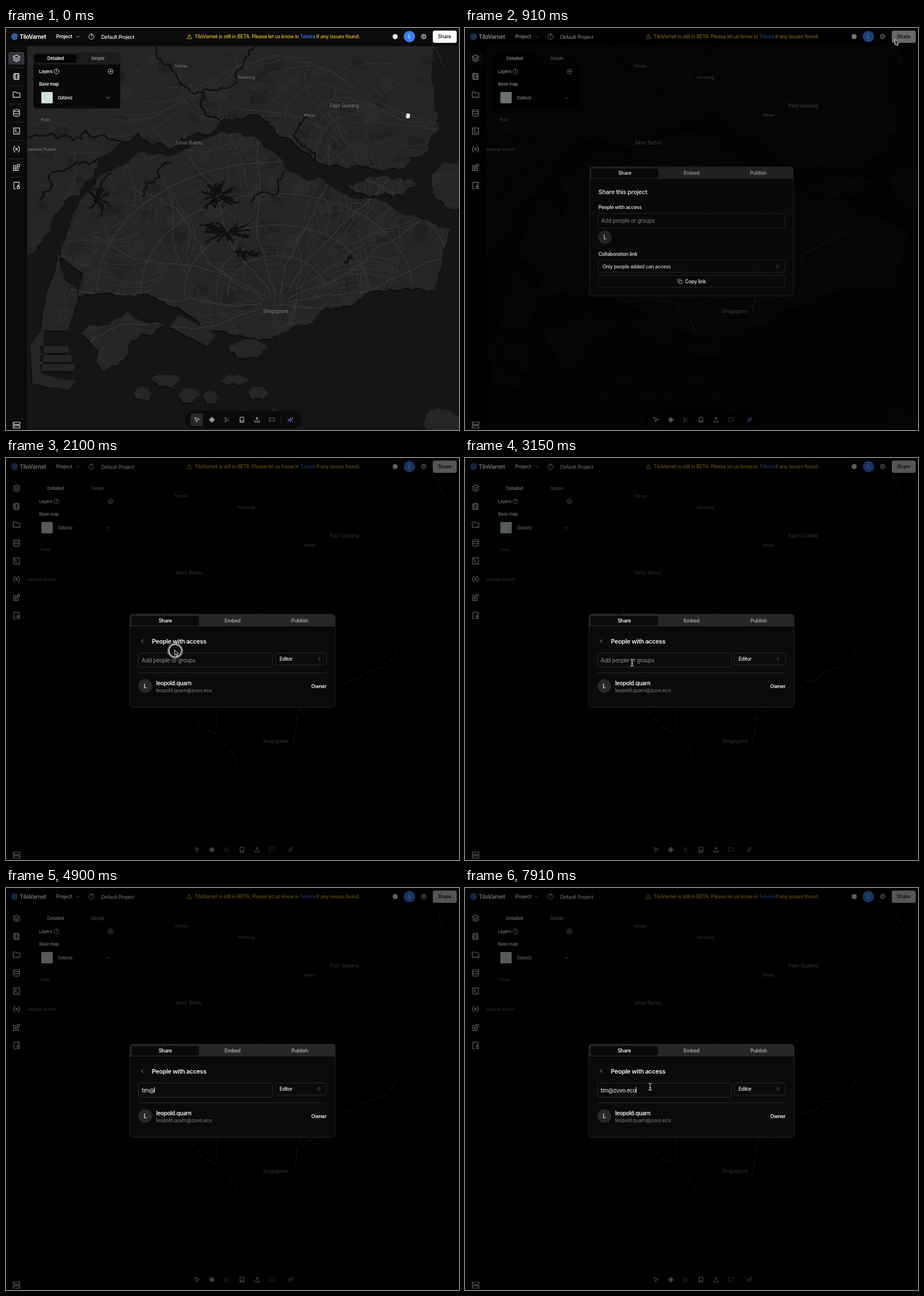
Write an HTML page that moves like this. It is 795 px wide and 704 px high and loops after 8 s.

```html
<!DOCTYPE html>
<html lang="en">
<head>
<meta charset="utf-8">
<title>Share a project</title>
<style>
  html, body { margin: 0; height: 100%; overflow: hidden; background: #000; }
  svg { display: block; width: 100vw; height: 100vh; }
  text { font-family: Inter, Arial, sans-serif; letter-spacing: -.03em; white-space: pre; }
  .place { font-family: "Noto Sans", sans-serif; letter-spacing: 0; }
</style>
</head>
<body>
<svg id="stage" viewBox="0 0 795 704"></svg>
<script>
const LOOP = 8000;
const WHITE = '#f5f5f5', GREY = '#a3a3a0', EDGE = '#2a2a2a', CARD = '#0a0a0a', MUTED = '#92929a';
const SEA = '#151515', LAND = '#252525';

// Seeded random numbers keep the map the same on every load.
let seed = 11;
const rnd = () => (seed = (seed * 16807) % 2147483647) / 2147483647;
const spread = size => (rnd() - .5) * size;
const repeat = (count, make) => Array.from({ length: count }, (_, i) => make(i)).join('');

// ---- Drawing helpers ----
const text = (x, y, str, size = 8.75, weight = 500, fill = WHITE, anchor = 'start', extra = '') =>
  `<text x="${x}" y="${y + size * .36}" font-size="${size}" font-weight="${weight}" fill="${fill}" text-anchor="${anchor}" ${extra}>${str}</text>`;
const rect = (x, y, w, h, r = 0, fill = 'none', stroke = 'none') =>
  `<rect x="${x}" y="${y}" width="${w}" height="${h}" rx="${r}" fill="${fill}" stroke="${stroke}"/>`;
const circle = (x, y, r, fill = 'none', stroke = 'none', width = 1) =>
  `<circle cx="${x}" cy="${y}" r="${r}" fill="${fill}" stroke="${stroke}" stroke-width="${width}"/>`;
const line = (d, stroke, width = 1, extra = '') =>
  `<path d="${d}" fill="none" stroke="${stroke}" stroke-width="${width}" stroke-linejoin="round" stroke-linecap="round" ${extra}/>`;
const icon = (x, y, d, size = 14, color = '#e5e5e5') =>
  `<g transform="translate(${x - size / 2} ${y - size / 2}) scale(${size / 24})">${line(d, color, 2)}</g>`;

const CHEVRON_DOWN = 'M5 9l7 7 7-7';
const CHEVRONS = 'M7 15l5 5 5-5M7 9l5-5 5 5';

// ---- Map ----
// Splits each side with random offsets, so a few points become a natural shore.
function rough(points, closed = true, amount = .2) {
  let pts = points.split(' ').map(p => p.split(',').map(Number));
  for (let pass = 0; pass < 4; pass++) {
    pts = pts.flatMap((a, i) => {
      if (!closed && i === pts.length - 1) return [a];
      const b = pts[(i + 1) % pts.length], k = spread(2 * amount);
      return [a, [(a[0] + b[0]) / 2 - (b[1] - a[1]) * k, (a[1] + b[1]) / 2 + (b[0] - a[0]) * k]];
    });
  }
  return 'M' + pts.map(p => p.map(v => v.toFixed(1))).join('L') + (closed ? 'Z' : '');
}

function island(x, y, w, h) {
  const corners = Array.from({ length: 6 }, (_, i) =>
    [x + Math.cos(i * Math.PI / 3) * w * (.4 + rnd() * .2), y + Math.sin(i * Math.PI / 3) * h * (.4 + rnd() * .2)]);
  return rough(corners.join(' '));
}

const NORTH_SHORE = '30,20 752,20 746,88 750,130 740,215 690,248 612,241 547,236 490,190 440,152 385,158 345,185 290,211 232,182 185,216 128,295 75,358 30,402';
const MAIN_ISLAND = '322,210 375,181 432,190 492,248 550,262 604,296 690,322 786,348 752,458 650,459 560,489 480,536 405,538 296,488 215,468 128,470 96,398 112,340 160,262 240,216';
const land = rough(NORTH_SHORE) + rough(MAIN_ISLAND, true, .15) +
  rough('130,535 214,494 276,520 214,570 170,602') +
  rough('92,398 62,530 42,556 46,622 108,634 125,618 62,605 66,530 108,530 136,430', true, .04) +
  island(662, 277, 115, 38) + island(798, 272, 100, 90) + island(762, 696, 70, 60) + island(425, 562, 64, 30) +
  repeat(7, i => island(240 + i * 40, 640 + spread(80), 30 + rnd() * 24, 16 + rnd() * 10)) +
  repeat(3, i => `M60 ${557 + i * 16}h${50 + i * 5}v12H60z`) +
  repeat(2, i => `M${302 + i * 32} ${502 + i * 16}l34 18-14 22-34-18z`);

// Streets follow a slowly turning grid.
function streets(count, steps, x0, y0, w, h) {
  return repeat(count, () => {
    let x = x0 + rnd() * w, y = y0 + rnd() * h, d = `M${x} ${y}`;
    const turn = rnd() < .5 ? Math.PI / 2 : 0;
    for (let k = 0; k < steps; k++) {
      const angle = Math.sin(x / 90) + Math.cos(y / 70) + turn + spread(.5);
      d += `L${(x += Math.cos(angle) * 8).toFixed(1)} ${(y += Math.sin(angle) * 8).toFixed(1)}`;
    }
    return d;
  });
}

// Expressways: spokes from the city centre, crossed by rings.
const spokes = repeat(11, i => {
  const a = Math.PI * (.92 + i * .11);
  const at = (r, bend) => [475 + Math.cos(a + bend) * r * 1.25, 485 + Math.sin(a + bend) * r].join();
  return rough(`${at(20, 0)} ${at(120, spread(.3))} ${at(220, spread(.2))} ${at(290, 0)}`, false, .07);
});
const rings = repeat(4, i => {
  const r = 60 + i * 55;
  return `M${475 - r * 1.4} 470A${r * 1.4} ${r} 0 0 1 ${475 + r * 1.4} 450`;
});

const patches = count => repeat(count, () => {
  const w = 8 + rnd() * 24;
  return `M${45 + rnd() * 690} ${40 + rnd() * 450}l${w} ${spread(14)}l${spread(10)} ${w * .7}l${-w} ${spread(12)}z`;
});

// A reservoir is a cluster of short thick arms.
const reservoir = (x, y, w, h) => line(repeat(Math.round(w * h / 90), () => {
  const dx = spread(w), dy = spread(h);
  return `M${x + dx * .3} ${y + dy * .3}l${dx * .7} ${dy * .7}l${spread(14)} ${spread(10)}`;
}), '#101010', 3.4);

const rivers = ['250,20 300,85 374,160', '448,20 420,52 345,108', '545,235 505,190 528,155', '38,190 140,180 232,184', '60,300 120,240 160,228', '290,236 268,262 240,295', '430,305 478,285 490,250', '185,255 160,290 165,330']
  .map(s => rough(s, false, .28)).join('');

const map = `
  ${rect(0, 0, 795, 704, 0, SEA)}
  <clipPath id="shore"><path d="${land}"/></clipPath>
  <path d="${land}" fill="#0d0d0d" transform="translate(-1.5 2)"/>
  <path d="${land}" fill="${LAND}"/>
  <g clip-path="url(#shore)">
    <path d="${patches(110)}" fill="#202020"/><path d="${patches(50)}" fill="#292929"/>
    ${line(streets(520, 5, 110, 190, 580, 340), '#313131', .8)}
    ${line(streets(90, 16, 110, 200, 640, 330), '#343434', 1)}
    ${line(streets(220, 6, 40, 35, 710, 200), '#2d2d2d', .7)}
    ${line(streets(34, 26, 40, 35, 700, 190), '#333', 1.1)}
    ${line(streets(70, 5, 42, 400, 220, 230), '#303030', .8)}
    ${line(spokes + rings, '#363636', 1.7)}
    ${line(rivers, '#101010', 3)}
    ${reservoir(372, 294, 56, 46)}${reservoir(388, 358, 84, 34)}${reservoir(422, 397, 44, 18)}${reservoir(162, 300, 36, 38)}${reservoir(602, 401, 18, 20)}
  </g>`;

const railways = ['690,330 660,366 600,392 505,460', '278,262 300,400 372,486 405,535', '440,270 410,370 370,470', '548,275 510,370 505,500', '750,32 770,68']
  .map(s => rough(s, false, .1)).join('');
const place = (x, y, str, size = 7) => text(x, y, str, size, 500, '#858585', 'start', 'class="place"');
const labels = line(railways, '#4a4a4a', .8, 'stroke-dasharray="2 1.6"') +
  place(296, 66, 'Tebrau') + place(407, 86, 'Plentong') + place(523, 152, 'Masai') + place(568, 136.5, 'Pasir Gudang', 8.2) +
  place(298, 201.5, 'Johor Bahru', 8.3) + place(61, 160, 'Pulai') + place(38, 212, 'kandar Puteri', 7.8) + place(451, 496, 'Singapore', 9.4);

// ---- Application frame ----
const surfaces = rect(0, 0, 795, 32, 0, CARD) + rect(0, 32, 38, 672, 0, CARD) +
  line('M0 32H795M37.5 32V704', '#1d1d1d', .8) + line(repeat(7, i => `M5 ${69 + i * 32}H32`) + 'M5 684H32', '#292929') +
  rect(4, 42, 28, 22, 3, '#34353c') +
  rect(48, 43, 152.5, 98, 5, '#090909') + rect(48, 43, 152.5, 21, 5, '#1b1b1a') + rect(50, 46, 74, 15, 3, '#050505') +
  rect(314, 670.5, 205, 31, 15.5, '#0a0a0b') + rect(324, 675, 21.5, 22, 3, '#282826') + line('M482.5 678v15', '#242424');

const sidebarIcons = [
  'M12 2 22 7 12 12 2 7ZM2 12l10 5 10-5M2 17l10 5 10-5',
  'M5 3h14v18H5zM9 3v18M15 3v18M2 7h4M2 12h4M2 17h4M15 9h4M15 15h4',
  'M2 4h7l3 3h10v13H2z',
  'M3 5a9 3 0 0 0 18 0a9 3 0 0 0-18 0v14a9 3 0 0 0 18 0V5M3 12a9 3 0 0 0 18 0',
  'M3 3h18v18H3zM7 7l4 4-4 4M12 16h5',
  'M7 3q-8 9 0 18M17 3q8 9 0 18M9 9l6 6M15 9l-6 6',
  'M14 3h7v7h-7zM3 7h7v14H3zM3 14h14v7H3z',
  'M20 9V2H4v20h6M14 15h7v6h-7zM16 15v-4h3v4'
].map((d, i) => icon(18.5, 53 + i * 31.85, d)).join('') + icon(18.5, 695.5, 'M2 3h20v7H2zM2 14h20v7H2zM6 6.5h.1M6 17.5h.1');

const toolbarIcons = [
  'M4 4l7 17 2.5-7.5L21 11z',
  'M9 3h6v5H9zM9 16h6v5H9zM3 9h5v6H3zM16 9h5v6h-5zM12 8v8M8 12h8',
  'M3 6a3 3 0 1 0 6 0a3 3 0 1 0-6 0M3 18a3 3 0 1 0 6 0a3 3 0 1 0-6 0M20 4L8 16M8 8l12 12',
  'M5 2h14v20H5zM5 17h14',
  'M12 15V3M7 8l5-5 5 5M3 15v6h18v-6',
  'M3 4h18v13H8l-5 4z'
].map((d, i) => icon(335 + i * 26.4, 686, d, 10.5, i === 2 || i === 5 ? '#777' : '#e5e5e5')).join('') +
  icon(499, 686, 'M12 4l2 6 7 2-7 2-2 7-2-7-7-2 7-2zM20 2v5M17.5 4.5h5M4 17v4', 10.5, '#8d78e6');

const help = (x, y, r) => circle(x, y, r, 'none', '#e5e5e5', .9) + text(x, y, '?', r * 1.5, 600, '#e5e5e5', 'middle');

const frameUi = circle(15, 15, 6, '#2d5f9c') + text(24, 15, 'TiloVarnet', 9.8, 700) +
  text(88, 15, 'Project', 8.75, 600) + icon(126, 15, CHEVRON_DOWN, 9) + help(150, 15, 4.6) + text(167, 15.5, 'Default Project') +
  icon(321.5, 15, 'M12 3 2 21h20zM12 9v5M12 17.5v.1', 10, '#eab92c') +
  text(331, 15, 'TiloVarnet is still in BETA. Please let us know in <tspan fill="#4a86f0">Tolvira</tspan> if any issues found.', 8.8, 500, '#eebf2f') +
  circle(683, 15, 4.5, '#e8e8e8') + circle(708, 15, 10, '#3b7ff0') + text(708, 15, 'L', 8.5, 500, WHITE, 'middle') +
  circle(733, 15, 3.4, 'none', '#ddd', 1.1) + circle(733, 15, 1.2, 'none', '#ddd', .9) +
  line(repeat(8, i => `M733 15m${4 * Math.cos(i * Math.PI / 4)} ${4 * Math.sin(i * Math.PI / 4)}h.1`), '#ddd', 1.4) +
  `<rect id="shareButton" x="749" y="4.5" width="42" height="21.5" rx="3.5"/>` + text(769.5, 15, 'Share', 8.9, 500, '#111', 'middle') +
  text(87, 53, 'Detailed', 7.7, 600, WHITE, 'middle') + text(161, 53, 'Simple', 7.7, 500, GREY, 'middle') +
  text(58, 76, 'Layers', 7.7, 600) + help(88.5, 76, 4.3) + circle(183.5, 76, 4.3, 'none', '#e5e5e5', .9) + line('M181.500 76h4M183.500 74v4', '#e5e5e5', .9) +
  text(58, 98, 'Base map', 7.7, 600) + rect(62, 112, 20, 20, 2, '#cfdfe0') + line('M64 130l6-9 5-1 5-7', '#e6efee') +
  text(91, 122, 'Dataviz', 7.7) + icon(179, 122, CHEVRON_DOWN, 9) + sidebarIcons + toolbarIcons;

// ---- Dialog pages ----
const PLACEHOLDER = 'Add people or groups';
const shell = (y, h) => rect(217.5, y, 360, h, 5, CARD, '#282828') +
  `<path d="M218 ${y + 21.5}v-17q0-4 4-4h351q4 0 4 4v17z" fill="#272725"/>` + rect(220, y + 3, 119, 17, 4, CARD) +
  ['Share', 'Embed', 'Publish'].map((s, i) => text(279.5 + i * 118, y + 11.3, s, 8.75, 600, i ? GREY : WHITE, 'middle')).join('');
const avatar = y => circle(244.5, y, 12, '#282826') + text(244.5, y, 'L', 10, 500, WHITE, 'middle');
const box = (x, y, w, h) => rect(x, y, w, h, 3, 'none', EDGE);

const sharePage = shell(241.5, 228) + text(232.7, 286.5, 'Share this project', 10.9, 600) +
  text(232.7, 312.7, 'People with access', 8.75, 600) + box(232.5, 324, 330, 25.5) + text(238, 336.7, PLACEHOLDER, 9.75, 400, MUTED) +
  avatar(366) + text(232.7, 395.5, 'Collaboration link', 8.75, 600) +
  box(232.5, 406.5, 330, 21.5) + text(240, 417.5, 'Only people added can access') + icon(549.5, 417.5, CHEVRONS, 8, GREY) +
  box(232.5, 433, 330, 21.5) + icon(377, 443.8, 'M9 9h13v13H9zM5 15H2V2h13v3', 9) + text(386, 443.8, 'Copy link', 8.75, 600);

const peoplePage = shell(273.5, 163) + icon(239.5, 320.7, 'M15 5l-7 7 7 7', 9) + text(256, 320.7, 'People with access', 10.9, 600) +
  box(232.5, 341.5, 235, 25) + text(238, 354, '', 9.75, 400, MUTED, 'start', 'id="field"') +
  `<path id="caret" d="M0 348.5v10.5" stroke="#fff" stroke-width=".9"/>` +
  box(472.5, 341.5, 90, 21) + text(480, 352, 'Editor') + icon(549.5, 352, CHEVRONS, 8, GREY) +
  line('M232.5 376H562.5', EDGE) + avatar(399.3) + text(263.5, 394, 'leopold.quarn', 9.75, 600) +
  text(263.5, 407, 'leopold.quarn@zuvo.eco', 8.75, 400, '#7b7e88') + text(562.5, 399.5, 'Owner', 8.75, 600, WHITE, 'end') +
  `<g id="suggestion"><path d="M305 367l4.5-4.5 4.5 4.5z" fill="#1d1d1d"/>${rect(297, 366, 94, 26.5, 3, '#1d1d1d', '#262626')}${text(304, 379.5, 'asdasdd', 7.9, 600)}</g>`;

// Each pointer is drawn around its tip.
const BEAM = 'M-2.8-6Q0-6 0-4.5V4.5Q0 6-2.8 6M2.8-6Q0-6 0-4.5M0 4.5Q0 6 2.8 6M-1.5 2h3';
const pointers = `
  <g id="ring">${circle(297, 337.5, 13.2, 'none', '#b5b5b5', 1)}${circle(297, 337.5, 11, 'none', '#e5e5e5', 1.5)}</g>
  <g id="pointer" stroke-linejoin="round">
    <path id="hand" d="M-2 10.500L-4.500 6q0-1.500 1.500-.5l1 1-1-5q1-1 2 0h1q1-1 2 0 1.200 0 1.500 1 1.200 0 1.200 1.500l-1.500 6.500z" fill="#fff" stroke="#111" stroke-width=".7"/>
    <path id="arrow" d="M0 0v9.500l2.200-2 1.600 3.600 1.700-.8-1.600-3.400 3-.2z" fill="#111" stroke="#fff" stroke-width=".9"/>
    <g id="beam">${line(BEAM, '#000', 2.2)}${line(BEAM, '#ddd', 1.1)}</g>
  </g>`;

const stage = document.getElementById('stage');
stage.innerHTML = `<g id="ground">${map}${surfaces}</g>${labels}${frameUi}
  <rect id="dim" width="795" height="704"/>
  <g id="sharePage">${sharePage}</g><g id="peoplePage">${peoplePage}</g>${pointers}`;
const el = Object.fromEntries([...stage.querySelectorAll('[id]')].map(node => [node.id, node]));

// ---- Timeline ----
const clamp = v => Math.min(1, Math.max(0, v));
const show = (node, on) => node.setAttribute('visibility', on ? 'visible' : 'hidden');
const within = (t, from, to) => t >= from && t < to;

// Each move glides from wherever the pointer is to x, y.
const MOVES = [
  { from: 70, to: 350, x: 754.5, y: 20 },
  { from: 980, to: 1470, x: 481, y: 256 },
  { from: 1470, to: 1890, x: 296, y: 336 },
  { from: 2520, to: 2730, x: 300, y: 348.5 },
  { from: 2800, to: 3010, x: 293.3, y: 358.3 },
  { from: 7280, to: 7910, x: 325, y: 348 }
];
function pointerAt(t) {
  let x = 705, y = 148;
  for (const move of MOVES) {
    const k = clamp((t - move.from) / (move.to - move.from));
    x += (move.x - x) * k;
    y += (move.y - y) * k;
  }
  return [x, y];
}

// The name is typed first; a short pause comes before the domain.
const [NAME, DOMAIN] = ['tim', '@zuvo.eco'];
const keysPressed = (t, start, pace) => Math.max(0, Math.floor((t - start) / pace) + 1);
const typedAt = t => NAME.slice(0, keysPressed(t, 4200, 170)) + DOMAIN.slice(0, keysPressed(t, 4900, 140));

function draw(t) {
  const open = 1 - (1 - clamp((t - 832) / 130)) ** 2;
  el.ground.setAttribute('opacity', 1 - open ** 2);
  el.dim.setAttribute('opacity', .59 * open);
  el.shareButton.setAttribute('fill', t < 350 ? '#fff' : '#cfcfcf');

  show(el.sharePage, within(t, 832, 2100));
  el.sharePage.setAttribute('opacity', open);
  el.sharePage.setAttribute('transform',
    `translate(397.5 ${355.5 + 3.5 * (1 - open)}) scale(${.95 + .05 * open}) translate(-397.5 -355.5)`);
  el.peoplePage.style.display = t >= 2100 ? '' : 'none';

  const typed = typedAt(t);
  el.field.textContent = typed || PLACEHOLDER;
  el.field.setAttribute('fill', typed ? WHITE : MUTED);
  const caretX = typed ? 238 + el.field.getComputedTextLength() : 238;
  el.caret.setAttribute('transform', `translate(${caretX + .4} 0)`);
  el.caret.style.display = within(t, 3500, 4060) || within(t, 4200, 6580) || t >= 7070 ? '' : 'none';
  el.suggestion.setAttribute('opacity', clamp((t - 3150) / 140) * (1 - clamp((t - 4200) / 140)));

  show(el.ring, within(t, 2100, 2170));
  el.pointer.setAttribute('transform', `translate(${pointerAt(t).join(' ')})`);
  show(el.hand, t < 560);
  show(el.arrow, within(t, 560, 2590));
  show(el.beam, t >= 2590 && !within(t, 4200, 7000));
}

function tick() {
  draw(performance.now() % LOOP);
  requestAnimationFrame(tick);
}
tick();
</script>
</body>
</html>
```
